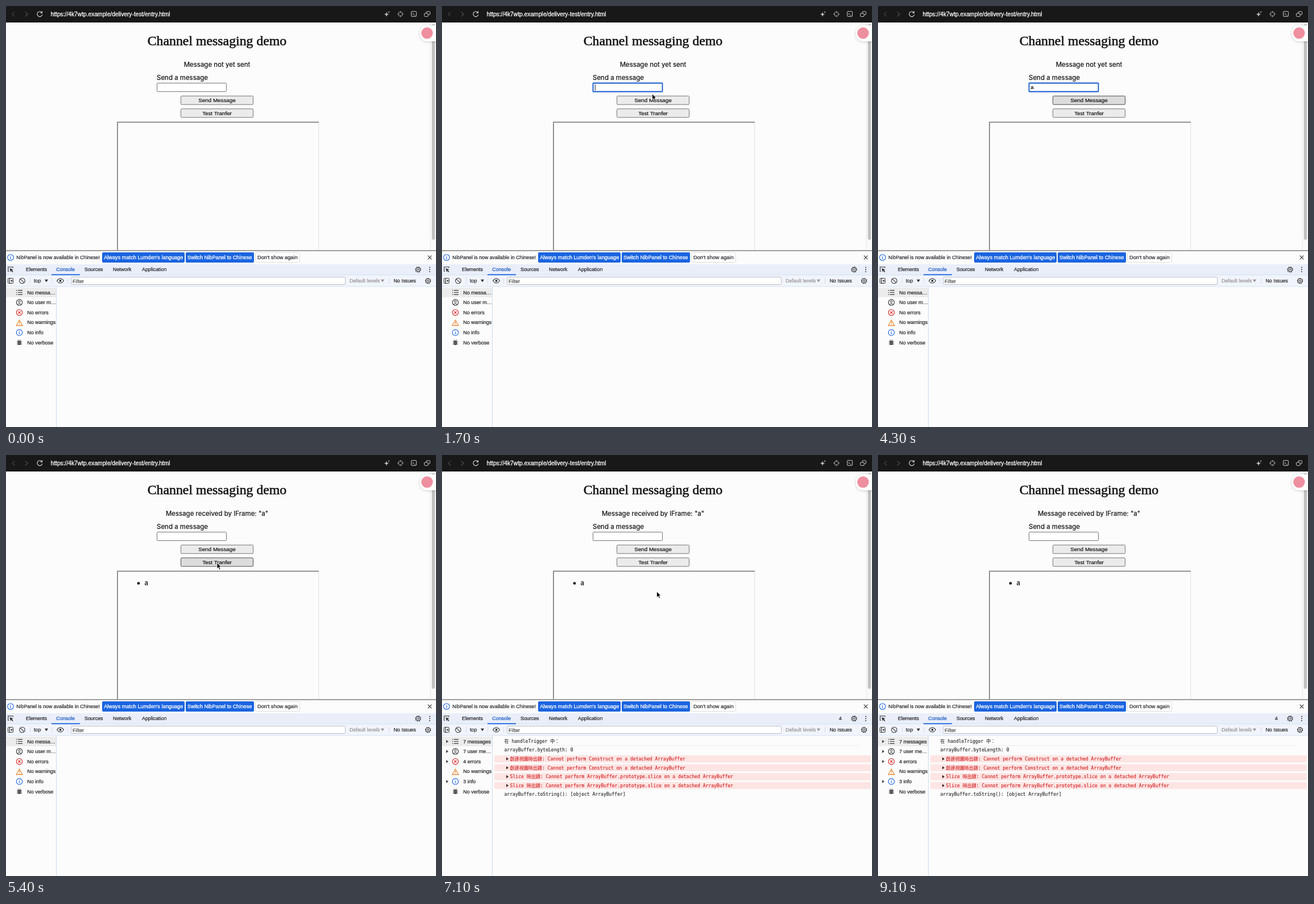
An HTML page for the animation above (9.2 s loop, 756x740 px).

```html
<!DOCTYPE html>
<html lang="en">
<head>
<meta charset="utf-8">
<title>Channel messaging demo</title>
<style>
html, body { margin: 0; width: 100%; height: 100%; overflow: hidden; background: #fcfcfc; }
svg { display: block; font-family: "Liberation Sans", Arial, sans-serif; }
text { stroke-width: .2px; }
.serif { font-family: "Liberation Serif", Times, serif; stroke-width: .55px; }
.body { font-family: Inter, "Liberation Sans", sans-serif; }
.mono { font-family: "DejaVu Sans Mono", "Noto Sans CJK TC", "Noto Sans CJK SC", "Noto Sans CJK", monospace; white-space: pre; stroke-width: .1px; }
.strong { stroke-width: .3px; }
</style>
</head>
<body>
<svg id="stage" width="756" height="740" viewBox="0 0 756 740"></svg>
<script>
const LOOP = 9200, STEP = 100;
const INK = '#202124', BLUE = '#1a64e0', FOCUS = '#1259d0', RED = '#d32020';

// Drawing helpers, each returning markup
const text = (x, y, str, size = 9, fill = INK, attrs = '') =>
  `<text x="${x}" y="${y}" font-size="${size}" fill="${fill}" stroke="${fill}" ${attrs}>${str}</text>`;
const middle = (y, str, size, style = '') =>
  text(371, y, str, size, '#111', `text-anchor="middle" class="${style}"`);
const box = (x, y, w, h, fill, attrs = '') =>
  `<rect x="${x}" y="${y}" width="${w}" height="${h}" fill="${fill}" ${attrs}/>`;
const disc = (x, y, r, fill, attrs = '') =>
  `<circle cx="${x}" cy="${y}" r="${r}" fill="${fill}" ${attrs}/>`;
const ring = (x, y, r, color, width = 1) =>
  disc(x, y, r, 'none', `stroke="${color}" stroke-width="${width}"`);
const line = (d, color = INK, width = 1) =>
  `<path d="${d}" fill="none" stroke="${color}" stroke-width="${width}"/>`;
const shape = (d, fill = INK) => `<path d="${d}" fill="${fill}"/>`;
const group = (id, body) => `<g id="${id}">${body}</g>`;
const strong = 'class="strong"';

const gear = (x, y) => ring(x, y, 3.7, '#333', 1.1) + ring(x, y, 1.4, '#333', 1) +
  disc(x, y, 4.7, 'none', 'stroke="#333" stroke-width="1.2" stroke-dasharray="1.85 1.84"');
const infoIcon = (x, y) => ring(x, y, 5.3, BLUE, 1.1) +
  line(`M${x} ${y - .7}v3.6M${x} ${y - 3}v1.2`, BLUE, 1.2);
const down = (x, y) => `M${x} ${y}h6l-3 4.6z`;
const right = (x, y) => `M${x} ${y - 2.8}v5.6l4 -2.8z`;

function topBar() {
  const c = '#c4c4c4';
  return box(0, 0, 756, 29, '#181818') +
    line('M15 10.5l-4 4 4 4', '#686868') + line('M34 10.5l4 4 -4 4', '#7a7a7a') +
    line('M63 11.5a4.5 4.5 0 1 0 .8 3.6M63.5 9.3v3h-3', '#e4e4e4', 1.1) +
    text(78.5, 17.7, 'https://4k7wtp.example/delivery-test/entry.html', 10.25, '#fff', strong) +
    shape('M669 10.5l1.1 3.1 3.1 1.1 -3.1 1.1 -1.1 3.1 -1.1 -3.1 -3.1 -1.1 3.1 -1.1zM673 9l.5 1.3 1.3 .5 -1.3 .5 -.5 1.3 -.5 -1.3 -1.3 -.5 1.3 -.5z', c) +
    ring(693.5, 14.2, 3.9, '#a0a0a0') +
    line('M693.5 8.8v3.4M693.5 16.2v3.4M688 14.2h3.4M695.6 14.2h3.4', '#a0a0a0') +
    box(712.5, 9.5, 9, 9, 'none', `rx="1.5" stroke="${c}"`) +
    line('M714.6 12l2 2 -2 2M717.5 16.3h2.2', c) +
    box(739, 9.8, 6.5, 5.5, 'none', `rx="1" stroke="${c}"`) +
    box(735.5, 13, 6.5, 5.5, '#181818', `rx="1" stroke="${c}"`);
}

function button(id, y, label) {
  return box(307.5, y, 127, 15, '#ebebeb', `id="${id}" rx="1.5" stroke="#767676"`) +
    middle(y + 10.9, label, 9.8);
}

function page() {
  return middle(69, 'Channel messaging demo', 23.8, 'serif') +
    group('waiting', middle(106.5, 'Message not yet sent', 11.5, 'body')) +
    group('received', middle(106.5, 'Message received by IFrame: "a"', 11.5, 'body') +
      disc(233, 225.5, 2.3, '#000') + text(243.5, 229.3, 'a', 11.5, '#111', 'class="body"')) +
    text(265, 130.2, 'Send a message', 11.5, '#111', 'class="body"') +
    box(265.5, 135.5, 122, 15, '#fff', 'id="field" rx="1" stroke="#767676"') +
    group('caret', line('M269.2 138v10.5', '#222')) +
    group('compose', line('M270.5 147v-7.5h5.5v7.5', '#222') + line('M269 148.3h9', '#222')) +
    group('typed', text(268.2, 146.3, 'a', 9.8, '#000')) +
    button('send', 158.2, 'Send Message') + button('test', 180.8, 'Test Tranfer') +
    line('M549.7 204v226', '#e4e4e4') + line('M196 430V204.3H550', '#767676', 1.6) +
    box(746, 29, 10, 401, '#fafafa') + line('M746.2 29v401', '#e6e6e6') +
    box(748.8, 32, 5.4, 379, '#c1c1c1', 'rx="2.7"') +
    box(728, 34, 40, 28, '#fff', 'rx="13" filter="url(#soft)"') +
    disc(740.3, 47.6, 10.2, '#ee8f9f');
}

function pill(x, w, label, labelX, size) {
  return box(x, 433, w, 18, BLUE, 'rx="2"') + text(labelX, 445.4, label, size, '#fff', strong);
}

function toolPanel() {
  const tabs = [[35, 'Elements'], [138, 'Sources'], [188, 'Network'], [239, 'Application']];
  return box(0, 429, 756, 311, '#fcfcfc') + box(0, 429.3, 756, 1.4, '#777') +
    infoIcon(8, 442) +
    text(18.2, 445.2, 'NibPanel is now available in Chinese!', 8.8) +
    pill(169, 145, "Always match Lumden's language", 172.2, 9.2) +
    pill(316, 120, 'Switch NibPanel to Chinese', 319, 9.2) +
    box(438.5, 433.5, 78, 17, '#fff', 'rx="2" stroke="#dedede"') +
    text(442, 445.4, "Don't show again", 9.25) +
    line('M741.7 438.7l6.6 6.6M748.3 438.7l-6.6 6.6', '#333', 1.1) +

    box(0, 454, 756, 19, '#e9eef9') + box(0, 473, 756, 20, '#f1f4fb') +
    line('M0 472.8H756M0 493H756', '#d5e1f4') +
    line('M5 466.5H3.8V458.8H12.3V460.5', '#333', 1.1) +
    shape('M6.5 461l6.3 2.3 -2.6 1 2.6 2.7 -1.1 1.1 -2.7 -2.7 -1 2.5z', '#333') +
    tabs.map(([x, s]) => text(x, 466.3, s, 8.9)).join('') +
    text(88.3, 466.3, 'Console', 8.9, '#1655c0') + box(80, 471.4, 50, 1.8, BLUE) +
    gear(724.5, 463.3) + [459.5, 463.3, 467.1].map(y => disc(745, y, 1, '#333')).join('') +

    box(3.5, 478.5, 9, 9, 'none', 'rx="1" stroke="#333"') + line('M6.3 478.5v9', '#333', 1.2) +
    shape('M11 480.8v4.4l-3 -2.2z', '#333') +
    ring(28.5, 483, 4.8, '#333', 1.1) + line('M25.1 479.6l6.8 6.8', '#333', 1.1) +
    line('M42.5 478v10M80.5 478v10M108.5 478v10M673.5 478v10', '#d3dcec') +
    text(49, 486.1, 'top') + shape(down(68, 480.8), '#333') +
    line('M89.5 483q6 -8 12 0q-6 8 -12 0z', '#333', 1.1) + disc(95.5, 483, 1.9, '#333') +
    box(114.5, 476.5, 482, 13, '#fff', 'rx="2" stroke="#b8bcc4"') + text(117, 486.5, 'Filter', 9, '#444') +
    text(604, 486.1, 'Default levels', 8.85, '#929292') + shape(down(659, 480.8), '#929292') +
    text(681.5, 486.1, 'No Issues', 8.8) + gear(742, 483.2);
}

const rowY = i => 503.5 + i * 17.6;
const rowLabels = labels => labels.map((s, i) => s ? text(37.2, rowY(i) + 3.1, s) : '').join('');

function sidebar() {
  const bug = rowY(5);
  return box(0, 495, 88, 17, '#ececec') + line('M88.5 493V740', '#cbdcf2') +
    [499.8, 503.5, 507.2].map(y => line(`M18 ${y}h1.5M21 ${y}h8`, '#333', 1.2)).join('') +
    ring(23.5, rowY(1), 5.2, '#333', 1.1) + ring(23.5, rowY(1) - 1.4, 1.7, '#333') +
    line('M19.8 524.6q3.7 -3 7.4 0', '#333') +
    ring(23.5, rowY(2), 5.2, RED, 1.1) + line('M21.4 536.6l4.2 4.2M25.6 536.6l-4.2 4.2', RED, 1.1) +
    line('M23.5 552l5.4 9.6h-10.8z', '#e8791c', 1.1) + line('M23.5 555v3M23.5 559v1.1', '#e8791c', 1.1) +
    infoIcon(23.5, rowY(4)) +
    box(21.4, bug - 3, 4.2, 7, '#777', 'rx="2.1" stroke="#333"') +
    line(`M19 ${bug - 2}h9M19 ${bug + .6}h9M19 ${bug + 3.2}h9M21 ${bug - 5}l1.3 2M26 ${bug - 5}l-1.3 2`, '#333', .9) +
    rowLabels(['', '', '', 'No warnings', '', 'No verbose']);
}

function consoleLog() {
  const mono = (x, y, s, fill) => text(x, y, s, 8.05, fill, 'class="mono"');
  const construct = '創建視圖時出錯: Cannot perform Construct on a detached ArrayBuffer';
  const slice = 'Slice 時出錯: Cannot perform ArrayBuffer.prototype.slice on a detached ArrayBuffer';
  const errors = [construct, construct, slice, slice].map((s, i) => {
    const y = 534.1 + i * 15.65;
    return box(92, y - 6.3, 662, 12.6, '#fde5e4', 'rx="3"') +
      shape(right(113, y), '#4a2020') + mono(119.6, y + 2.9, s, '#d01818');
  });
  return mono(109.5, 506.1, '在 handleTrigger 中：', INK) + line('M109 510.8H736', '#ebebeb') +
    mono(109.5, 521.4, 'arrayBuffer.byteLength: 0', INK) + errors.join('') +
    mono(109.5, 599.2, 'arrayBuffer.toString(): [object ArrayBuffer]', INK);
}

const stage = document.getElementById('stage');
stage.innerHTML =
  `<defs><filter id="soft" x="-40%" y="-40%" width="180%" height="180%">
    <feDropShadow dx="0" dy="1" stdDeviation="2.5" flood-color="#000" flood-opacity=".18"/></filter></defs>` +
  page() + topBar() + toolPanel() + sidebar() +
  group('before', rowLabels(['No messa…', 'No user m…', 'No errors', '', 'No info'])) +
  group('after', rowLabels(['7 messages', '7 user me…', '4 errors', '', '3 info']) +
    [0, 1, 2, 4].map(i => shape(right(7.3, rowY(i)), '#444')).join('') +
    text(697.8, 466.3, '4') + consoleLog()) +
  group('pointer',
    group('arrow', '<path d="M0 0V10.2L2.4 8L4.1 12L6 11.2L4.3 7.3H7.4Z" fill="#000" stroke="#fff" stroke-width=".8"/>') +
    group('beam', line('M-2 -5q2 0 2 1.5V4q0 1.5 -2 1.5M2 -5q-2 0 -2 1.5V4q0 1.5 2 1.5', '#222')));

const el = id => document.getElementById(id);
const show = (id, on) => el(id).setAttribute('display', on ? 'inline' : 'none');

// Pointer path: time, x, y
const path = [
  [400, 430, 300], [1100, 345, 143], [1400, 345, 143], [1700, 369.5, 154.5], [2000, 374.5, 167],
  [4800, 374.5, 167], [5200, 371, 189.5], [6400, 371, 189.5], [6900, 377.5, 240],
  [8100, 377.5, 240], [8700, 560, -16]
];

function pointerAt(t) {
  const i = path.findIndex(p => p[0] > t);
  if (i < 0) return path[path.length - 1].slice(1);
  if (i === 0) return path[0].slice(1);
  const [t0, x0, y0] = path[i - 1], [t1, x1, y1] = path[i];
  const k = (t - t0) / (t1 - t0), e = k * k * (3 - 2 * k);
  return [x0 + (x1 - x0) * e, y0 + (y1 - y0) * e];
}

function draw(t) {
  const within = (from, to) => t >= from && t < to;
  const [x, y] = pointerAt(t);
  const sent = t >= 4700, logged = t >= 6300;
  const focus = within(1300, 4700), typed = within(3700, 4700), compose = within(2300, 3000);
  const blinkFrom = t < 3000 ? 1300 : 3000;
  const over = (left, top, w, h) => x > left && x < left + w && y > top && y < top + h;

  show('waiting', !sent);
  show('received', sent);
  show('before', !logged);
  show('after', logged);
  show('typed', typed);
  show('compose', compose);
  show('caret', focus && !typed && !compose && (t - blinkFrom) % 1000 < 500);

  el('field').setAttribute('stroke', focus ? FOCUS : '#767676');
  el('field').setAttribute('stroke-width', focus ? 1.8 : 1);
  for (const [id, top] of [['send', 158], ['test', 181]]) {
    const hover = t >= 400 && over(307, top, 128, 15);
    el(id).setAttribute('fill', hover ? '#dcdcdc' : '#ebebeb');
    el(id).setAttribute('stroke', hover ? '#4f4f4f' : '#767676');
  }

  const beam = over(265, 135, 123, 16);
  show('pointer', within(400, 3000) || within(4500, 8700));
  show('arrow', !beam);
  show('beam', beam);
  el('pointer').setAttribute('transform', `translate(${x.toFixed(2)} ${y.toFixed(2)})`);
}

const start = performance.now();
function tick() {
  const t = (performance.now() - start) % LOOP;
  draw(Math.floor(t / STEP) * STEP);
  requestAnimationFrame(tick);
}
tick();
</script>
</body>
</html>
```
